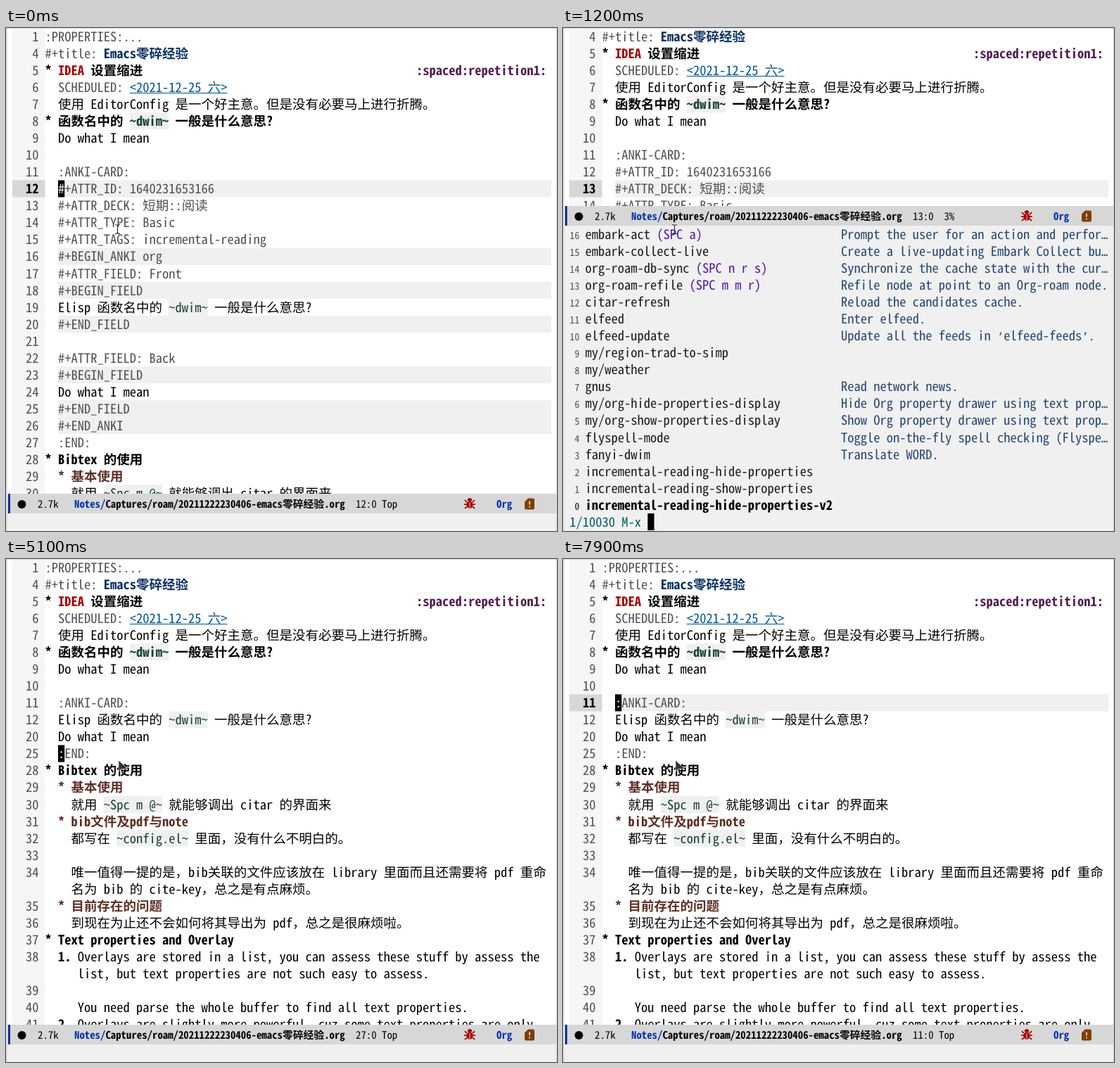
Write an HTML page that moves like this. It is 783 px wide and 715 px high and loops after 8000 ms.

```html
<!DOCTYPE html>
<html lang="zh-CN">
<head>
<meta charset="utf-8">
<title>Editor</title>
<style>
html, body { margin: 0; width: 100%; height: 100%; overflow: hidden; background: #fff; }
svg { display: block; width: 783px; height: 715px; }
text {
  font: 18.5px "Noto Sans Mono CJK SC", "Noto Sans CJK SC", "Noto Sans Mono", monospace;
  white-space: pre; text-rendering: geometricPrecision;
  font-variant-ligatures: none; fill: #000;
}
.small { font-size: 14.8px; }
.index { font-size: 13.9px; fill: #505050; }
.half { font-family: "DejaVu Sans Mono", monospace; font-size: 15.4px; }
.bold, .h1, .h2, .todo, .title, .tag, .codeb, .path { font-weight: bold; }
.dim { fill: #505050; }
.h2 { fill: #5d3026; }
.todo { fill: #a60000; }
.title { fill: #093060; }
.tag { fill: #541f4f; }
.date { fill: #00538b; }
.code, .codeb { fill: #184034; }
.path { fill: #0031a9; }
.name { fill: #1c1c1c; }
.key { fill: #5317ac; }
.note { fill: #26466f; }
.prompt { fill: #005a5f; }
.inv { fill: #fff; }
</style>
</head>
<body>
<svg id="stage" viewBox="0 0 783 715" xmlns="http://www.w3.org/2000/svg"></svg>
<script>
const CW = 9.25, LH = 24.05, LEFT = 55.5, LOOP = 8000;
const stage = document.getElementById('stage');

// Each line: [number, column, style, text, style, text, ...]
const head = [
  [1, 0, 'dim', ':PROPERTIES:...'],
  [4, 0, 'dim', '#+title: ', 'title', 'Emacs零碎经验'],
  [5, 0, 'h1', '* ', 'todo', 'IDEA', 'h1', ' 设置缩进'],
  [6, 2, 'dim', 'SCHEDULED: ', 'date', '<2021-12-25 六>'],
  [7, 2, '', '使用 EditorConfig 是一个好主意。但是没有必要马上进行折腾。'],
  [8, 0, 'h1', '* 函数名中的 ', 'codeb', '~dwim~', 'h1', ' 一般是什么意思?'],
  [9, 2, '', 'Do what I mean'],
  [10, 2],
  [11, 2, 'dim', ':ANKI-CARD:']
];
const question = ['', 'Elisp 函数名中的 ', 'code', '~dwim~', '', ' 一般是什么意思?'];
const citar = [30, 4, '', '就用 ', 'code', '~Spc m @~', '', ' 就能够调出 citar 的界面来'];

const props = [...head,
  [12, 2, 'dim', '#+ATTR_ID: 1640231653166'],
  [13, 2, 'dim', '#+ATTR_DECK: 短期::阅读'],
  [14, 2, 'dim', '#+ATTR_TYPE: Basic'],
  [15, 2, 'dim', '#+ATTR_TAGS: incremental-reading'],
  [16, 2, 'dim', '#+BEGIN_ANKI org'],
  [17, 2, 'dim', '#+ATTR_FIELD: Front'],
  [18, 2, 'dim', '#+BEGIN_FIELD'],
  [19, 2, ...question],
  [20, 2, 'dim', '#+END_FIELD'],
  [21, 2],
  [22, 2, 'dim', '#+ATTR_FIELD: Back'],
  [23, 2, 'dim', '#+BEGIN_FIELD'],
  [24, 2, '', 'Do what I mean'],
  [25, 2, 'dim', '#+END_FIELD'],
  [26, 2, 'dim', '#+END_ANKI'],
  [27, 2, 'dim', ':END:'],
  [28, 0, 'h1', '* Bibtex 的使用'],
  [29, 2, 'h2', '* 基本使用'],
  citar
];

const cards = [...head,
  [12, 2, ...question],
  [20, 2, '', 'Do what I mean'],
  [25, 2, 'dim', ':END:'],
  [28, 0, 'h1', '* Bibtex 的使用'],
  [29, 2, 'h2', '* 基本使用'],
  citar,
  [31, 2, 'h2', '* bib文件及pdf与note'],
  [32, 4, '', '都写在 ', 'code', '~config.el~', '', ' 里面，没有什么不明白的。'],
  [33, 4],
  [34, 4, '', '唯一值得一提的是，bib关联的文件应该放在 library 里面而且还需要将 pdf 重命'],
  ['', 4, '', '名为 bib 的 cite-key，总之是有点麻烦。'],
  [35, 2, 'h2', '* 目前存在的问题'],
  [36, 4, '', '到现在为止还不会如何将其导出为 pdf，总之是很麻烦啦。'],
  [37, 0, 'h1', '* Text properties and Overlay'],
  [38, 2, 'bold', '1. ', '', 'Overlays are stored in a list, you can assess these stuff by assess the'],
  ['', 5, '', 'list, but text properties are not such easy to assess.'],
  [39, 5],
  [40, 5, '', 'You need parse the whole buffer to find all text properties.'],
  [41, 2, 'bold', '2. ', '', 'Overlays are slightly more powerful, cuz some text-properties are only']
];

// Command list from index 16 down to 0: name, key, note
const commands = [
  ['embark-act', ' (SPC a)', 'Prompt the user for an action and perfor…'],
  ['embark-collect-live', '', 'Create a live-updating Embark Collect bu…'],
  ['org-roam-db-sync', ' (SPC n r s)', 'Synchronize the cache state with the cur…'],
  ['org-roam-refile', ' (SPC m m r)', 'Refile node at point to an Org-roam node.'],
  ['citar-refresh', '', 'Reload the candidates cache.'],
  ['elfeed', '', 'Enter elfeed.'],
  ['elfeed-update', '', 'Update all the feeds in ‘elfeed-feeds’.'],
  ['my/region-trad-to-simp'],
  ['my/weather'],
  ['gnus', '', 'Read network news.'],
  ['my/org-hide-properties-display', '', 'Hide Org property drawer using text prop…'],
  ['my/org-show-properties-display', '', 'Show Org property drawer using text prop…'],
  ['flyspell-mode', '', 'Toggle on-the-fly spell checking (Flyspe…'],
  ['fanyi-dwim', '', 'Translate WORD.'],
  ['incremental-reading-hide-properties'],
  ['incremental-reading-show-properties'],
  ['incremental-reading-hide-properties-v2']
];

// [start ms, view, cursor row or chosen index]
const steps = [
  [0, 'props', 9], [100, 'props', 10], [200, 'props', 11], [300, 'props', 12],
  [500, 'props', 11], [700, 'props', 10],
  [1200, 'list', 0], [1700, 'list', 1], [2200, 'list', 0],
  [3800, 'cards', 9], [4800, 'cards', 10], [5100, 'cards', 11],
  [5300, 'cards', 9], [5400, 'cards', 8], [5600, 'cards', 7],
  [5800, 'cards', 8], [5900, 'cards', 7], [6000, 'cards', 8],
  [6100, 'cards', 7], [6200, 'cards', 8], [6300, 'cards', 9],
  [6600, 'cards', 8], [6800, 'cards', 9], [7000, 'cards', 10],
  [7200, 'cards', 11], [7500, 'cards', 9], [7700, 'cards', 8]
];
const hiddenLines = { 9: 19, 10: 24, 11: 27 };

const cells = s => [...s].reduce((n, c) => n + (c > '\u2e7f' ? 2 : 1), 0);
const escape = s => s.replace(/&/g, '&amp;').replace(/</g, '&lt;')
  .replace(/[‘’…]/g, '<tspan class="half">$&</tspan>');
const rect = (x, y, w, h, fill) =>
  `<rect x="${x}" y="${y}" width="${w}" height="${h}" fill="${fill}"/>`;
const text = (x, y, style, s) => `<text x="${x}" y="${y}" class="${style}">${escape(s)}</text>`;
const baseline = top => top + 18.8;

function bufferLine(line, row, opts) {
  const [num, col, ...runs] = line;
  const top = row * LH, base = baseline(top), label = String(num);
  const isBlock = /^#\+(BEGIN|END)_/.test(runs[1] || '');
  let out = '';
  if (opts.lit) {
    out += rect(9, top, 46.5, LH, '#d7d7d7') + rect(74, top, 701, LH, '#f2eff3');
  } else if (isBlock) {
    out += rect(74, top, 701, LH, '#f0f0f0');
  }
  out += text(46.5 - CW * label.length, base, opts.lit ? 'bold' : 'dim', label);
  let x = LEFT + CW * col;
  for (let i = 0; i < runs.length; i += 2) {
    const [style, s] = [runs[i], runs[i + 1]];
    const w = CW * cells(s);
    if (style.startsWith('code')) out += rect(x, top, w, LH, '#f0f0f0');
    if (style === 'date') out += rect(x, Math.round(base + 1), w, 1, '#00538b');
    out += text(x, base, style, s);
    x += w;
  }
  if (num === 5) out += text(768 - CW * 20, base, 'tag', ':spaced:repetition1:');
  if (opts.cursor) {
    const cx = LEFT + CW * 2;
    out += rect(cx, top, CW, LH, '#000') + text(cx, base, 'inv', (runs[1] || '')[0] || '');
  }
  return out;
}

function buffer(lines, row, height, showCursor, canLight) {
  const body = lines.map((line, i) => bufferLine(line, i, {
    lit: canLight && i === row, cursor: showCursor && i === row
  })).join('');
  return `<clipPath id="pane"><rect width="783" height="${height}"/></clipPath>
    <g clip-path="url(#pane)">${rect(9, 0, 46.5, height, '#f6f6f6')}${body}</g>`;
}

function bug(x, y) {
  return `<g transform="translate(${x} ${y})" fill="#a60000" stroke="#a60000" stroke-width="1.7">
    <path d="M-8 1H8M-7-5L-4-2M7-5L4-2M-7 7L-4 4M7 7L4 4" fill="none"/>
    <ellipse cy="1.5" rx="4" ry="5" stroke-width="1"/>
    <path d="M-3-4.5A3 3 0 0 1 3-4.5Z" stroke-width="1"/>
    <path d="M0-2V7" stroke="#d7d7d7" stroke-width="1"/></g>`;
}

function card(x, y) {
  return `<g transform="translate(${x} ${y})">
    <path d="M-2-8H5Q7-8 7-6V6Q7 8 5 8H-5Q-7 8-7 6V-3Z" fill="#813e00"/>
    <path d="M0-4V1M0 3V5" stroke="#d7d7d7" stroke-width="1.8"/></g>`;
}

function modeLine(top, position) {
  const mid = top + 14.6, base = mid + 5;
  return rect(2, top, 780, 28, '#d7d7d7') + rect(3, top, 3, 28, '#0031a9') +
    `<circle cx="22.5" cy="${mid + 0.5}" r="6"/>` +
    text(45, base, 'small', '2.7k') +
    text(97, base, 'small path', 'Notes/') +
    text(141.4, base, 'small bold', 'Captures/roam/20211222230406-emacs零碎经验.org') +
    text(497, base, 'small', position) +
    bug(659, mid - 0.5) + text(697, base, 'small path', 'Org') + card(744, mid);
}

function commandList(chosen) {
  const start = 714 - 18 * LH;
  let out = rect(0, start - 1, 783, 716 - start, '#f0f0f0');
  commands.forEach(([name, key, note], i) => {
    const index = commands.length - 1 - i, label = String(index);
    const base = baseline(start + i * LH), bold = index === chosen ? 'bold' : '';
    out += text(23.5 - 6.95 * label.length, base, 'index ' + bold, label);
    out += text(31.5, base, bold || 'name', name);
    if (key) out += text(31.5 + CW * name.length, base, 'key', key);
    if (note) out += text(395, base, 'note', note);
  });
  const top = start + 17 * LH;
  return out + text(9.3, baseline(top), 'prompt', `${chosen + 1}/10030 M-x `) +
    rect(9.3 + CW * 12, top, CW, LH, '#000');
}

const beam = `<path d="M155 279.5Q158.5 279.5 158.5 281.5Q158.5 279.5 162 279.5
  M158.5 281V291M155 292.5Q158.5 292.5 158.5 290.5Q158.5 292.5 162 292.5"
  fill="none" stroke="#333" stroke-width="1.2"/>`;
const arrow = `<path d="M160 286V302L164 298.5H173Z" fill="#333" stroke="#fff" stroke-width=".6"/>`;
const edges = rect(0, 0, 1.5, 715, '#d4d4d4') + rect(782, 0, 1, 715, '#cfcfcf') +
  rect(0, 0, 783, 0.8, '#d4d4d4');

function draw(view, row) {
  let out = rect(0, 0, 783, 715, '#fff');
  if (view === 'list') {
    out += buffer(props.slice(1), 9, 253, false, true) +
      commandList(row) + modeLine(253, '13:0  3%') + beam;
  } else {
    const hidden = view === 'cards';
    const lines = hidden ? cards : props;
    const current = hidden && hiddenLines[row] || lines[row][0];
    out += buffer(lines, row, 662, true, !(hidden && hiddenLines[row])) +
      rect(0, 690, 783, 25, '#f0f0f0') + modeLine(662, `${current}:0 Top`) +
      (hidden ? arrow : beam);
  }
  stage.innerHTML = out + edges;
}

let shown = null;
function tick() {
  const t = performance.now() % LOOP;
  const step = steps.filter(s => s[0] <= t).pop();
  if (step !== shown) {
    shown = step;
    draw(step[1], step[2]);
  }
  requestAnimationFrame(tick);
}
tick();
</script>
</body>
</html>
```
